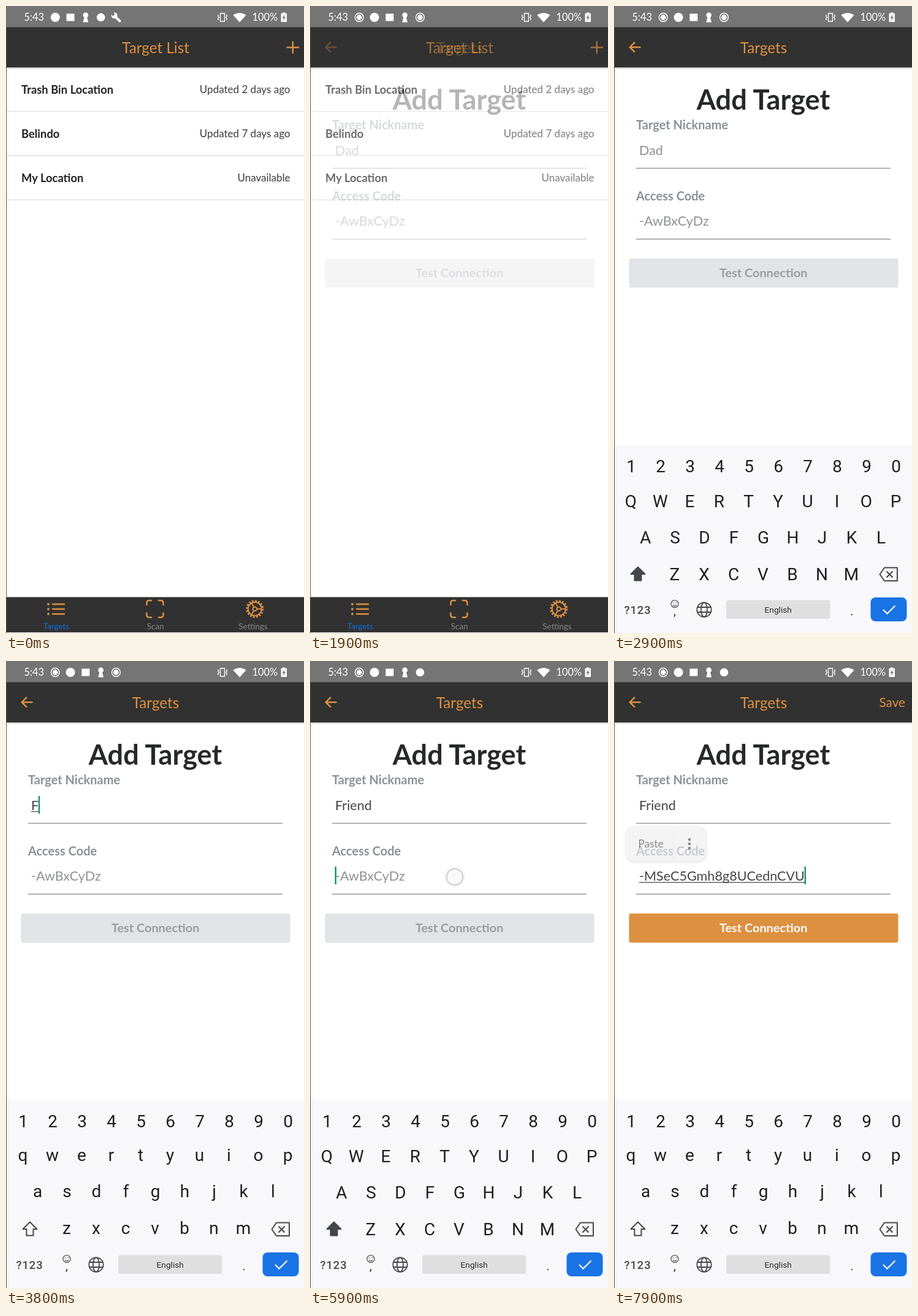
Animation, 486 px wide and 1022 px high, one loop 8 s. Source, as an HTML page:

```html
<!DOCTYPE html>
<html lang="en">
<head>
<meta charset="utf-8">
<title>Add target</title>
<style>
  html, body { margin: 0; width: 100%; height: 100%; overflow: hidden; background: #fff; }
  svg { display: block; width: 486px; height: 1022px; }
  text { font-family: Lato, "Open Sans", sans-serif; white-space: pre; }
  .mid { text-anchor: middle; }
  .end { text-anchor: end; }
  .bold { font-weight: 700; }
  .title { font-size: 24.3px; fill: #dd9040; }
  .name { font-size: 18.4px; font-weight: 700; fill: #222; }
  .note { font-size: 17px; fill: #3c3c3c; }
  .label { font-size: 20px; font-weight: 700; fill: #8a9199; }
  .input { font-size: 21.6px; }
  .tab { font-size: 13.5px; fill: #85878a; }
  .status { font-size: 16.4px; fill: #fff; }
  .key, #board text { font-family: Roboto, Arial, sans-serif; }
  .key { font-size: 28px; fill: #1e1f21; text-anchor: middle; }
  .line { fill: none; stroke: #dd9040; stroke-width: 2.5; }
  .ink { fill: none; stroke: #43464a; stroke-width: 2; }
  .white { fill: none; stroke: #fff; stroke-width: 1.5; }
</style>
</head>
<body>
<svg viewBox="0 0 486 1022">
  <defs>
    <linearGradient id="drop" x2="0" y2="1">
      <stop offset="0" stop-opacity=".28"/><stop offset="1" stop-opacity="0"/>
    </linearGradient>
    <filter id="soft" x="-30%" y="-30%" width="160%" height="160%"><feGaussianBlur stdDeviation="2.5"/></filter>
    <g id="rec"><circle r="6.9" class="white"/><circle r="4.4" fill="#fff"/></g>
    <g id="disc"><circle r="7.5" fill="#fff"/></g>
    <g id="block"><rect x="-6.5" y="-6" width="13" height="12" fill="#fff"/></g>
    <g id="dot"><circle r="6.8" fill="#fff"/></g>
    <g id="pawn"><circle cy="-3.6" r="4.3" fill="#fff"/><path d="M-2-1H2L4.4 8H-4.4Z" fill="#fff"/></g>
    <g id="wrench">
      <path d="M-2-2L6 6" stroke="#fff" stroke-width="4" stroke-linecap="round"/>
      <path d="M-7.6-4.5A5 5 0 1 0-4.2-7.8L-1.8-5.3L-4.9-1.9Z" fill="#fff"/>
    </g>
  </defs>

  <rect width="486" height="1022" fill="#fff"/>

  <g id="list">
    <rect y="34" width="486" height="66" fill="#313131"/>
    <rect y="100" width="486" height="3" fill="url(#drop)"/>
    <text class="title mid" x="244" y="76.5">Target List</text>
    <path id="plus" class="line" d="M457.5 67.5H478M467.8 57.5V77.5"/>
    <text class="name" x="25" y="143">Trash Bin Location</text>
    <text class="name" x="25" y="215">Belindo</text>
    <text class="name" x="25" y="287">My Location</text>
    <text class="note end" x="463.5" y="142">Updated 2 days ago</text>
    <text class="note end" x="463.5" y="214">Updated 7 days ago</text>
    <text class="note end" x="463.5" y="286">Unavailable</text>
    <path d="M0 171.8H486M0 243.8H486M0 316H486" stroke="#e3e3e4" stroke-width="1.6"/>
  </g>

  <g id="form">
    <rect y="100" width="486" height="864" fill="#fff"/>
    <rect y="34" width="486" height="66" fill="#313131"/>
    <rect y="100" width="486" height="3" fill="url(#drop)"/>
    <path class="line" d="M43.5 67.2H26M34 59L25.8 67.2L34 75.4"/>
    <text class="title mid" x="244" y="76.5">Targets</text>
    <text id="save" class="title end" x="475" y="75" style="font-size:20.7px">Save</text>
    <text class="mid bold" x="243.5" y="169" font-size="45.2" fill="#27282b">Add Target</text>
    <text class="label" x="36" y="201">Target Nickname</text>
    <text class="label" x="36" y="316.5">Access Code</text>
    <path d="M36 264.5H451M36 380H451" stroke="#98999b" stroke-width="1.6"/>
    <text id="nick" class="input" x="41" y="243"></text>
    <text id="code" class="input" x="41" y="358.3"></text>
    <path id="under" stroke="#444" stroke-width="1.2"/>
    <rect id="button" x="24.5" y="411.5" width="439" height="47.5" rx="3"/>
    <text id="test" class="mid bold" x="243.7" y="442.3" font-size="19.9">Test Connection</text>
    <rect id="caret" width="2.4" height="29" fill="#168f70"/>
    <path id="handle" d="M42 365L50.5 372A12 12 0 1 1 33.5 372Z" fill="#13947a"/>
    <g id="menu">
      <rect x="20" y="271" width="130" height="56" rx="12" opacity=".25" filter="url(#soft)"/>
      <rect x="19" y="270" width="131" height="56" rx="12" fill="#eeeeef"/>
      <path d="M97 271V325" stroke="#e3e3e5"/>
      <text x="39.5" y="303.5" font-size="17.2" fill="#3c3d40">Paste</text>
      <g fill="#3c3d40"><circle cx="123" cy="291" r="2.3"/><circle cx="123" cy="298" r="2.3"/><circle cx="123" cy="305" r="2.3"/></g>
    </g>
  </g>

  <rect y="963.5" width="486" height="57.5" fill="#313131"/>
  <path class="line" d="M75 975H96M75 983H96M75 991H96"/>
  <g fill="#dd9040"><circle cx="69" cy="975" r="1.9"/><circle cx="69" cy="983" r="1.9"/><circle cx="69" cy="991" r="1.9"/></g>
  <path class="line" stroke-linecap="round" d="M229.5 976V973Q229.5 969 233.5 969H237M249 969H252.5Q256.5 969 256.5 973V976M256.5 989.5V992.5Q256.5 996.5 252.5 996.5H249M237 996.5H233.5Q229.5 996.5 229.5 992.5V989.5"/>
  <g class="line" transform="translate(405.8 982.8)" style="stroke-width:2">
    <circle r="11"/>
    <circle r="13" stroke-dasharray="2.7 2.405" style="stroke-width:3.2"/>
    <circle r="3.2"/>
    <path d="M3.2 0H11M-1.6-2.8L-5.5-9.5M-1.6 2.8L-5.5 9.5"/>
  </g>
  <text class="tab mid" x="82" y="1016" style="fill:#1670dc">Targets</text>
  <text class="tab mid" x="243.7" y="1016">Scan</text>
  <text class="tab mid" x="403" y="1016">Settings</text>
  <rect y="34" width="1" height="988" fill="#555"/>

  <g id="board">
    <rect x="1" y="716" width="485" height="310" fill="#f8f8fb"/>
    <g id="keys"></g>
    <path id="shift" class="ink" stroke-linejoin="round" d="M39 914.5L50.5 926H44.5V936.5H33.5V926H27.5Z"/>
    <path class="ink" stroke-linejoin="round" d="M441 915.5H462V937H441L433.5 926.2ZM444.5 921.5L454.5 931.5M454.5 921.5L444.5 931.5"/>
    <text x="16.5" y="990.5" font-size="18.5" font-weight="500" letter-spacing=".9" fill="#43464a">?123</text>
    <g class="ink" style="stroke-width:1.2">
      <circle cx="99" cy="974.5" r="6"/>
      <path d="M96 976.5Q99 979.5 102 976.5M96.7 972V973.5M101.3 972V973.5"/>
    </g>
    <text class="mid" x="99" y="993" font-size="20" fill="#333">,</text>
    <g class="ink" transform="translate(147 984)" style="stroke-width:1.8">
      <circle r="11.7"/><ellipse rx="5" ry="11.7"/><path d="M-11-4H11M-11 4H11"/>
    </g>
    <rect x="183" y="968.5" width="169.5" height="30.5" rx="3.5" fill="#dfdfe0"/>
    <text class="mid" x="267.7" y="989" font-size="13.7" fill="#2a2b2d">English</text>
    <text class="mid" x="388" y="993" font-size="20" fill="#333">.</text>
    <rect x="418.5" y="964" width="59" height="39" rx="8" fill="#1a73e4"/>
    <path d="M439 984L445.5 990.5L458.5 977.5" fill="none" stroke="#fff" stroke-width="2.2"/>
  </g>

  <rect width="486" height="34.5" fill="#757575"/>
  <text class="status" x="29.5" y="24">5:43</text>
  <g id="icons"></g>
  <path class="white" d="M349.5 12H356.5V25H349.5ZM346.5 14L345.5 16L347.5 18.5L345.5 21L346.5 23M359.5 14L360.5 16L358.5 18.5L360.5 21L359.5 23" style="stroke-width:1.3"/>
  <path d="M370.5 15Q381 7.5 391.5 15L381 26.5Z" fill="#fff"/>
  <text class="status" x="401.5" y="24">100%</text>
  <path d="M451 10.5H455.5V12H458V26H448.5V12H451Z" fill="#fff"/>
  <path d="M454.5 13.5L450.5 19.5H453L452 24L456 18H453.5Z" fill="#757575"/>

  <g id="touch">
    <circle r="14.5" fill="#556" opacity=".16" filter="url(#soft)"/>
    <circle r="13" fill="#fff" fill-opacity=".78" stroke="#a9a9b8" stroke-opacity=".5" stroke-width="2"/>
  </g>
</svg>

<script>
const LOOP = 8000, STEP = 100;
const WORD = "Friend", KEY_TIMES = [3600, 4000, 4300, 4600, 4900, 5300];
const CODE = "-MSeC5Gmh8g8UCednCVU", PASTED = 7800;
const OPEN = 1900, FOCUS = 2300, NEXT = 5900, HOLD = 6900;

const $ = id => document.getElementById(id);
const clamp = v => Math.max(0, Math.min(1, v));
const ease = v => 1 - (1 - clamp(v)) ** 3;
const set = (el, attrs) => { for (const k in attrs) el.setAttribute(k, attrs[k]); };
const show = (id, on) => set($(id), { opacity: +on });

// Keyboard rows: text, first x, baseline; the pitch is shared.
const PITCH = 48;
const keys = [];
[["1234567890", 28, 760], ["qwertyuiop", 27.5, 816.5], ["asdfghjkl", 51.5, 876], ["zxcvbnm", 99, 936]]
  .forEach(([row, x0, y]) => [...row].forEach((ch, i) => {
    const el = document.createElementNS("http://www.w3.org/2000/svg", "text");
    const x = x0 + i * PITCH;
    set(el, { class: "key", x });
    $("keys").append(el);
    keys.push({ el, ch, x, y });
  }));

const taps = [[455, 68, 1600, 1900], [288, 246, 2200, 2600], [236, 352, 5800, 6100],
  [236, 359, HOLD, 7180], [62, 298, 7600, 7800]];
KEY_TIMES.forEach((time, i) => {
  const key = keys.find(k => k.ch === WORD[i].toLowerCase());
  taps.push([key.x, key.y - 8, time - 100, time + 100]);
});

function drawIcons(t) {
  const names = t < 500 ? ["disc", "block", "pawn", "dot", "wrench"]
    : ["rec", "disc", "block", "pawn", t < 5000 ? "rec" : "dot"];
  $("icons").innerHTML = names.map((n, i) =>
    `<use href="#${n}" x="${80.3 + i * 24.8}" y="18.5"/>`).join("");
}

function drawKeys(t) {
  const caps = t < KEY_TIMES[0] || (t >= NEXT && t < PASTED);
  for (const { el, ch, y } of keys) {
    el.textContent = caps ? ch.toUpperCase() : ch;
    set(el, { y: caps || y === 760 ? y : y - 2 });
  }
  set($("shift"), { style: `fill:${caps ? "#43464a" : "none"}` });
  set($("board"), { transform: `translate(0 ${310 * (1 - ease((t - 2500) / 300))})` });
}

function fill(el, value, hint) {
  el.textContent = value || hint;
  set(el, { fill: value ? "#444548" : "#8f9194" });
  return value ? el.getComputedTextLength() : 0;
}

function drawFields(t) {
  const typed = KEY_TIMES.filter(k => k <= t).length;
  const pasted = t >= PASTED, second = t >= NEXT;
  const nickWidth = fill($("nick"), WORD.slice(0, typed), "Dad");
  const codeWidth = fill($("code"), pasted ? CODE : "", "-AwBxCyDz");
  const width = second ? codeWidth : nickWidth;
  const base = second ? 360.8 : 245.5;
  set($("under"), { d: `M41 ${base}h${width}` });

  const since = [FOCUS, ...KEY_TIMES, NEXT, HOLD, PASTED].filter(k => k <= t).pop();
  show("caret", since !== undefined && (t - since) % 1000 < 500);
  set($("caret"), { x: 40.6 + width, y: second ? 335 : 220 });
  show("handle", t >= 7000 && !pasted);
  show("save", pasted);
  set($("button"), { fill: pasted ? "#dd9040" : "#e2e3e7" });
  set($("test"), { fill: pasted ? "#fff" : "#999ca1" });
}

function drawMenu(t) {
  const grow = clamp((t - 7060) / 240);
  const scale = 0.92 + 0.08 * grow;
  set($("menu"), {
    opacity: grow * clamp((8060 - t) / 260),
    transform: `translate(84.5 298) scale(${scale}) translate(-84.5 -298)`
  });
}

function drawTouch(t) {
  const tap = taps.find(([, , from, to]) => t >= from && t < to);
  if (!tap) return show("touch", false);
  set($("touch"), {
    transform: `translate(${tap[0]} ${tap[1]})`,
    opacity: clamp((tap[3] - t) / 200)
  });
}

function draw(t) {
  drawIcons(t);
  show("form", clamp((t - OPEN + 100) / 300));
  set($("plus"), { opacity: t >= 1600 && t < OPEN ? 0.2 : 1 });
  drawKeys(t);
  drawFields(t);
  drawMenu(t);
  drawTouch(t);
}

const start = performance.now();
let last = -1;
function tick() {
  const t = Math.floor((performance.now() - start) % LOOP / STEP) * STEP;
  if (t !== last) draw(last = t);
  requestAnimationFrame(tick);
}
tick();
</script>
</body>
</html>
```
